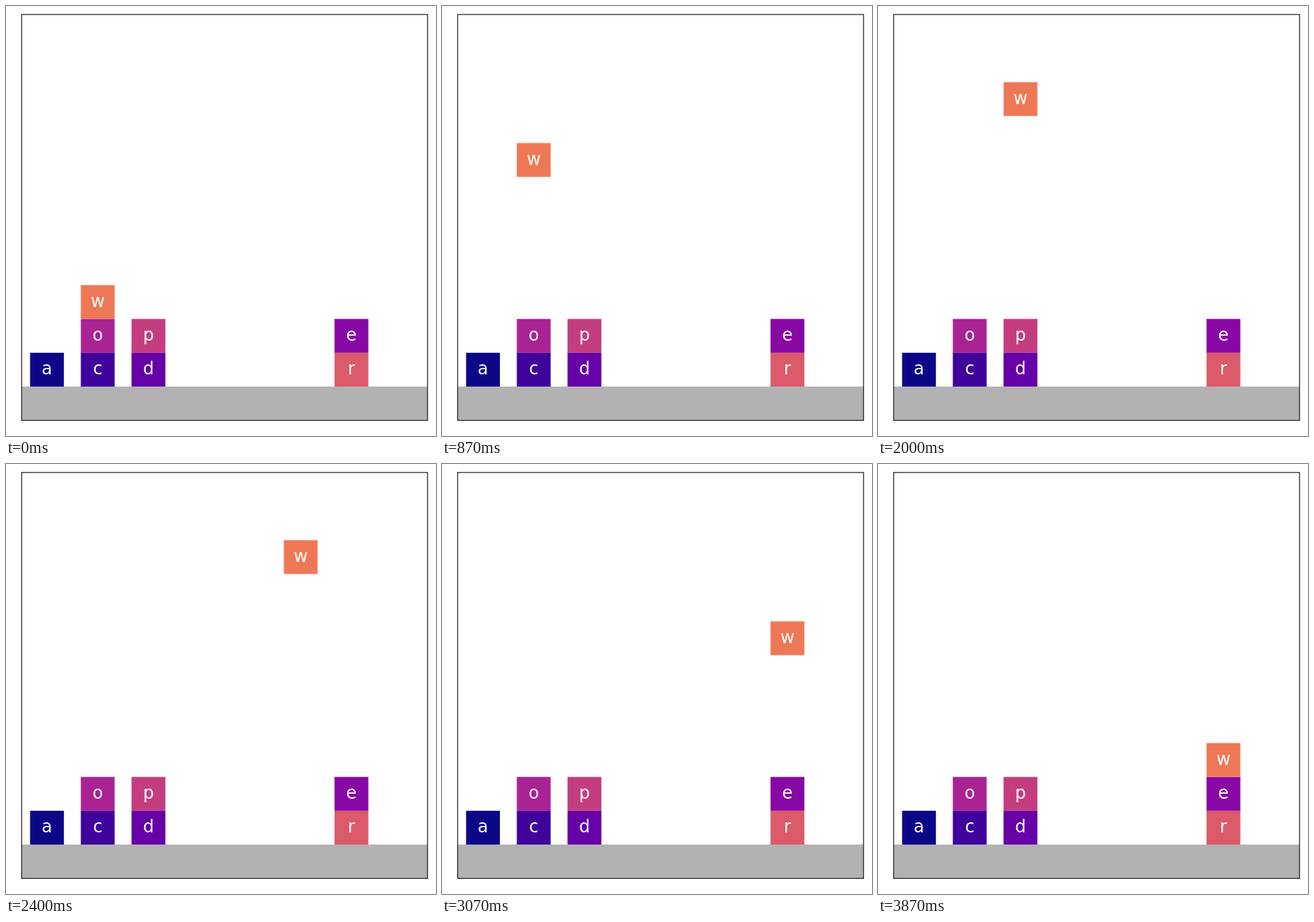
An HTML page that plays this animation: 600 px wide and 600 px high, repeating every 4.87 s.

```html
<!DOCTYPE html>
<html lang="en">
<head>
<meta charset="utf-8">
<title>Block stacking</title>
<style>
  html, body { margin: 0; width: 100%; height: 100%; overflow: hidden; background: #fff; }
  svg { display: block; width: 600px; height: 600px; }
  text { font: 24px "DejaVu Sans", sans-serif; fill: #fff; text-anchor: middle; }
</style>
</head>
<body>
<svg id="stage" viewBox="0 0 600 600"></svg>
<script>
  const LOOP = 4870;
  const UNIT = 47.2;
  const LEFT = 21.8, TOP = 11.85, SIZE = 12 * UNIT;
  const FLOOR = TOP + SIZE - UNIT;

  // letter, column, height in the stack, colour
  const BLOCKS = [
    ["a", 0, 0, "#0c0786"],
    ["c", 1, 0, "#3f039c"],
    ["o", 1, 1, "#a92395"],
    ["d", 2, 0, "#6600a7"],
    ["p", 2, 1, "#c43e7f"],
    ["r", 6, 0, "#da5a6a"],
    ["e", 6, 1, "#8808a6"],
    ["w", 1, 2, "#ee7855"]
  ];

  // first tick, last tick, steps done at first tick, step x, step y (in units)
  const MOVES = [
    [1, 19, 2, 0, -0.3],
    [30, 38, 2, 0.75, 0],
    [39, 58, 1, 0, 0.3]
  ];

  const stage = document.getElementById("stage");

  function add(parent, tag, attrs, text) {
    const el = document.createElementNS("http://www.w3.org/2000/svg", tag);
    for (const key in attrs) el.setAttribute(key, attrs[key]);
    if (text) el.textContent = text;
    return parent.appendChild(el);
  }

  function addBlock([letter, col, level, fill]) {
    const x = LEFT + (0.25 + 1.5 * col) * UNIT;
    const y = FLOOR - (level + 1) * UNIT;
    const g = add(stage, "g", {});
    add(g, "rect", { x, y, width: UNIT, height: UNIT, fill });
    add(g, "text", { x: x + UNIT / 2, y: y + UNIT / 2 + 7 }, letter);
    return g;
  }

  // 15 ticks per second, rounded to 10 ms
  const tickTime = i => 10 * Math.round(i * 20 / 3);

  function buildFrames() {
    const frame = (time, x, y) => ({
      offset: time / LOOP,
      transform: `translate(${(x * UNIT).toFixed(2)}px, ${(y * UNIT).toFixed(2)}px)`,
      easing: "steps(1, end)"
    });
    const frames = [frame(0, 0, 0)];
    let x = 0, y = 0;
    for (const [first, last, lead, dx, dy] of MOVES) {
      for (let i = first; i <= last; i++) {
        const n = i === first ? lead : 1;
        x += n * dx;
        y += n * dy;
        frames.push(frame(tickTime(i) - 0.01, x, y));
      }
    }
    frames.push(frame(LOOP, x, y));
    return frames;
  }

  add(stage, "rect", { x: LEFT, y: FLOOR, width: SIZE, height: UNIT, fill: "#b2b2b2" });
  const groups = BLOCKS.map(addBlock);
  add(stage, "rect", {
    x: LEFT, y: TOP, width: SIZE, height: SIZE,
    fill: "none", stroke: "#1c1c1c", "stroke-width": 1.2
  });

  groups[groups.length - 1].animate(buildFrames(), { duration: LOOP, iterations: Infinity });
</script>
</body>
</html>
```
